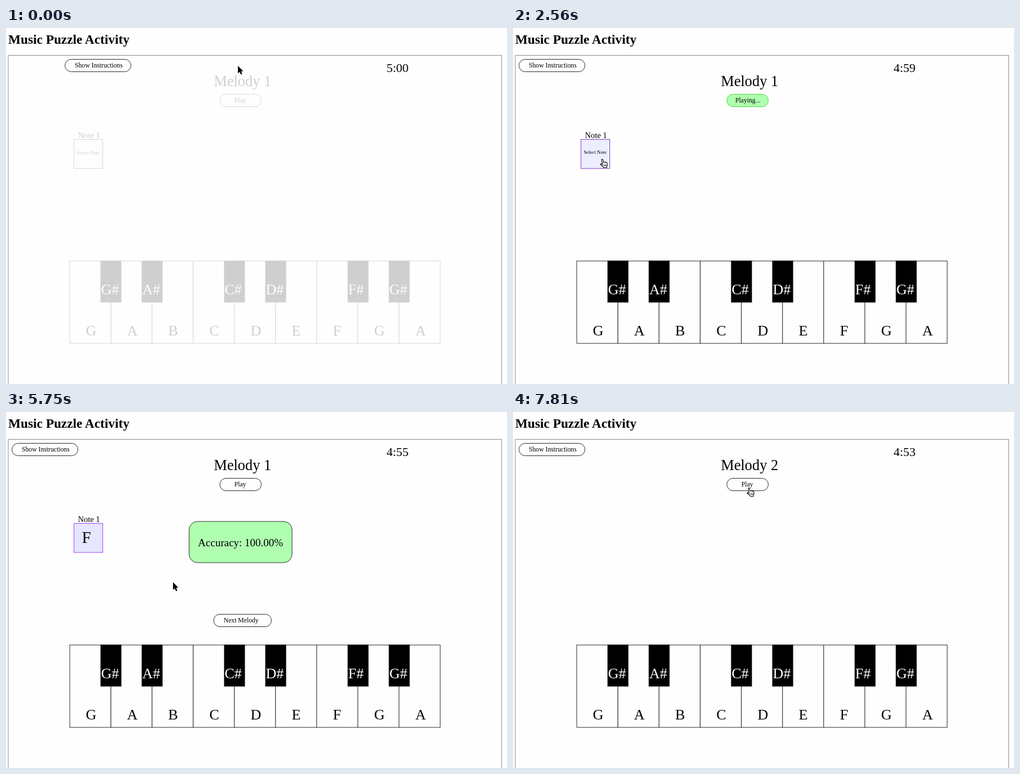
Write an HTML page that moves like this. It is 888x631 px and loops after 8 s.

```html
<!DOCTYPE html>
<html lang="en">
<head>
<meta charset="utf-8">
<title>Music Puzzle Activity</title>
<style>
  html, body { margin: 0; width: 100%; height: 100%; overflow: hidden; background: #fefefe; }
  svg { display: block; font-family: "Liberation Serif", "Times New Roman", serif; }
</style>
</head>
<body>
<svg id="stage" width="888" height="631" viewBox="0 0 888 631"></svg>
<script>
const LOOP = 8000;
const WHITE = [254, 254, 254], INK = [45, 45, 45], LIME = [51, 255, 51],
      MINT = [176, 255, 176], LILAC = [230, 230, 255], PURPLE = [163, 70, 255], BLUE = [153, 153, 255];
const stage = document.getElementById('stage');

const clamp = v => Math.max(0, Math.min(1, v));
const ease = p => p < .5 ? 4 * p ** 3 : 1 - (2 - 2 * p) ** 3 / 2;
const span = (t, from, to) => ease(clamp((t - from) / (to - from)));
const lerp = (a, b, p) => a + (b - a) * p;
const mix = (a, b, p) => a.map((v, i) => lerp(v, b[i], p));
const css = c => `rgb(${c.map(Math.round)})`;

const text = (s, x, y, size, extra = '') => `<text x="${x}" y="${y}" font-size="${size}" ${extra}>${s}</text>`;
const box = (x, y, w, h, r = 0, fill = WHITE, line = INK) =>
  `<rect x="${x}" y="${y}" width="${w}" height="${h}" rx="${r}" fill="${css(fill)}" stroke="${css(line)}"/>`;
const group = (s, attrs) => `<g ${attrs}>${s}</g>`;
const shift = (s, dx) => group(s, `transform="translate(${dx} 0)"`);

// Pointer tip: time, x, y
const path = [
  [0, 411, 67], [750, 411, 67], [1180, 412, 99], [1360, 417, 136], [1800, 417, 136],
  [2500, 158, 232], [2950, 158, 232], [3270, 624, 490], [3420, 584, 534], [3720, 584, 534],
  [4380, 406, 368], [5280, 406, 368], [5840, 288, 297], [7330, 288, 297], [7810, 418, 134], [LOOP, 418, 134]
];

function pointerAt(t) {
  const i = Math.max(1, path.findIndex(k => k[0] > t));
  const [t0, x0, y0] = path[i - 1], [t1, x1, y1] = path[i];
  const p = clamp((t - t0) / (t1 - t0)), s = p * p * (3 - 2 * p);
  return [lerp(x0, x1, s), lerp(y0, y1, s)];
}

function pointer(t) {
  const [x, y] = pointerAt(t);
  const over = (l, top, r, b) => x > l && x < r && y > top && y < b;
  const hand = over(379, 118, 453, 140) || over(120, 198, 172, 249) ||
    over(113, 413, 770, 559) || (t > 4300 && over(368, 358, 471, 381));
  const shape = hand
    ? `<path d="M4.5 10L3 2Q3 .5 4.2 .6Q5.2 .7 5.4 2L6.2 6Q7.4 4.8 8.4 6Q9.8 5 10.6 6.4Q12.6 6 13 8L13.2 11L12 13.5V15.5H6.5L5.5 13.5L1.5 10.5Q.6 9.3 1.8 8.6Q3 8.4 4.5 10Z" fill="#fff" stroke="#000" stroke-width="1.1"/>
       <path d="M7.2 10v3M9 10v3M10.8 10v3" stroke="#000" stroke-width=".8"/>`
    : `<path d="M0 0V13.5L3.1 10.7L5.3 15.6L7.6 14.6L5.5 9.8H9.6Z" stroke="#fff" stroke-width="1.4" paint-order="stroke"/>`;
  return group(shape, `transform="translate(${x - (hand ? 4 : 0)} ${y})"`);
}

function piano(t) {
  const press = t < 3560 ? 0 : 1 - span(t, 3680, 4340);
  let s = '';
  [...'GABCDEFGA'].forEach((name, i) => {
    s += box(113 + i * 72.95, 413, 72.95, 146, 0, i === 6 ? mix(WHITE, BLUE, press) : WHITE)
       + text(name, 141.6 + i * 73, 545, 26);
  });
  ['G#', 'A#', '', 'C#', 'D#', '', 'F#', 'G#'].forEach((name, i) => {
    const x = 167.5 + i * 73;
    if (name) s += `<rect x="${x}" y="412.5" width="37" height="74"/>` + text(name, x + 1, 472, 26, 'fill="#fff"');
  });
  return s;
}

function playButton(t) {
  const on = span(t, 1650, 1850) * (1 - span(t, 4380, 4740));
  const playing = t > 1700 && t < 4400;
  const line = t < 1500 || t > 4380 ? mix(INK, [60, 220, 60], on) : mix(LIME, [60, 220, 60], on);
  return box(379, 117.5, 73.5, 22, 11, mix(WHITE, MINT, on), line)
    + text(playing ? 'Playing...' : 'Play', lerp(404.7, 394, on), 132, 11.7);
}

function note(t) {
  const size = 1 + .5 * span(t, 1620, 1900) * (1 - span(t, 1980, 2620));
  const chosen = span(t, 2450, 2640);
  const label = t < 3560 ? text('Select Note', 125.3, 223.5, 8.75) : text('F', 134.6, 232, 29);
  const square = box(120.5, 197.5, 51, 51.5, 0, mix(WHITE, LILAC, chosen), mix(INK, PURPLE, chosen)) + label;
  return text('Note 1', 127.5, 194.5, 14.5)
    + group(square, `transform="translate(146 223.2) scale(${size}) translate(-146 -223.2)"`);
}

function result(t) {
  const hover = span(t, 4400, 4590) * (1 - span(t, 5400, 5800));
  return [
    box(324.5, 194, 182.5, 73, 15, MINT) + text('Accuracy: 100.00%', 340.3, 238, 19),
    box(368, 358.5, 102.5, 22, 11, mix(WHITE, [77, 255, 77], hover)) + text('Next Melody', 385.7, 373.3, 11.7)
  ];
}

function draw(t) {
  // The opening moves in held steps
  if (t < 380) t = t < 90 ? 0 : t < 230 ? 90 : 230;

  const fade = ease(clamp((t + 324) / 910));
  const menuX = 10.5 + 94 * (1 - clamp(t / 218)) ** 3;
  const left = 300 - Math.max(0, Math.ceil((t - 1585) / 1000));
  const clock = `${Math.floor(left / 60)}:${String(left % 60).padStart(2, '0')}`;

  let board = text('Melody ' + (t < 6570 ? 1 : 2), 368.5, 103, 26.3) + playButton(t) + piano(t);
  if (t < 7010) {
    const out = clamp((t - 6625) / 135) ** 3 + (t > 6760 ? ((t - 6625) / 135) ** 3 - 1 : 0);
    const [score, next] = result(t);
    board += group(
      shift(note(t), 20 * out)
      + group(shift(score, 17 * out) + shift(next, 22 * out), `opacity="${span(t, 4350, 4580)}"`),
      `opacity="${clamp(1 - out / 25)}"`);
  }

  stage.innerHTML =
    text('Music Puzzle Activity', 4, 27.5, 23.3, 'font-weight="bold"')
    + '<rect x="4" y="48.5" width="874.5" height="600" fill="none" stroke="#8c8c8c"/>'
    + box(menuX, 55.5, 117, 22, 11) + text('Show Instructions', menuX + 17.5, 70.3, 11.7)
    + text(clock, 674.5, 78, 22)
    + group(board, `opacity="${fade}"`)
    + pointer(t);
}

const start = performance.now();
function tick() {
  draw((performance.now() - start) % LOOP);
  requestAnimationFrame(tick);
}
tick();
</script>
</body>
</html>
```
